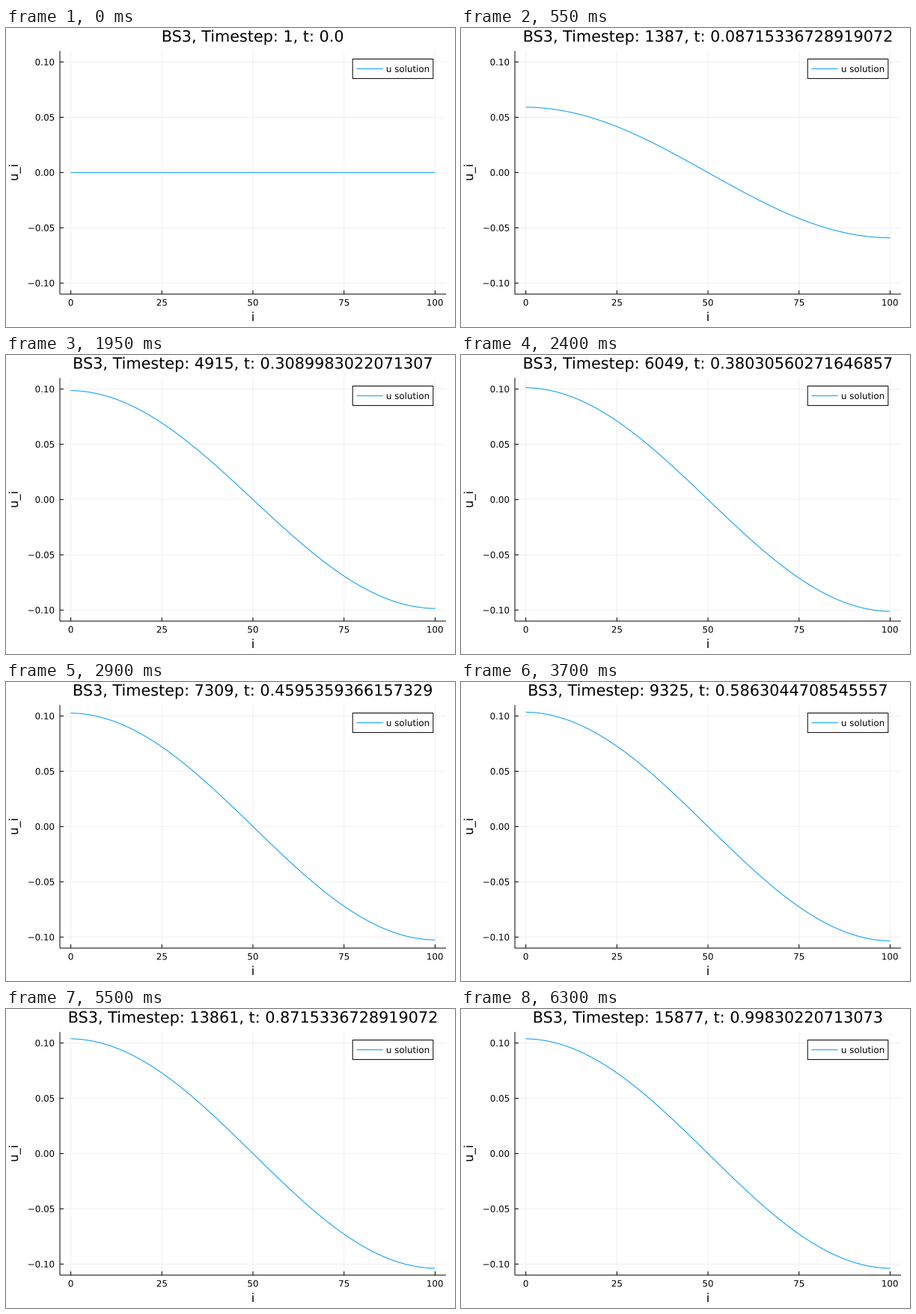
Recreate the animation shown at these times as a matplotlib script. Size 600 by 400 pixels, loop 6350 ms.

```python
import matplotlib.pyplot as plt
import numpy as np
from matplotlib.animation import FuncAnimation
from matplotlib.patches import PathPatch, Rectangle
from matplotlib.textpath import TextPath
from matplotlib.transforms import Affine2D

plt.rcParams["font.family"] = "DejaVu Sans"
plt.rcParams["path.simplify"] = False

W, H, DPI = 600, 400, 100
FRAMES, STRIDE, STEPS = 127, 126, 15903
LEFT, RIGHT, TOP, BOTTOM = 72, 588, 30.7, 356
BLUE = "#009AFA"
PX = 72 / DPI
TITLE, LABEL, TICK = 20.75, 16.3, 11.86  # font sizes in pixels

# Heat equation with insulated ends and a cosine source, solved by modes
N = 101
i = np.arange(N)
k = np.arange(1, N)
rates = 4 * np.sin(np.pi * k / (2 * N)) ** 2 * (N - 1) ** 2
modes = np.cos(np.pi * np.outer(i + 0.5, k) / N) * np.sqrt(2 / N)
source = modes.T @ np.cos(np.pi * i / (N - 1))


def solution(t):
    return modes @ (source * -np.expm1(-rates * t) / rates)


def to_x(v):
    return LEFT + (RIGHT - LEFT) * (v + 3) / 106


def to_y(v):
    return BOTTOM - (BOTTOM - TOP) * (v + 0.11) / 0.22


fig = plt.figure(figsize=(W / DPI, H / DPI), dpi=DPI, facecolor="white")
ax = fig.add_axes([0, 0, 1, 1])
ax.set_xlim(0, W)
ax.set_ylim(H, 0)
ax.axis("off")


def line(xs, ys, color="black", **kw):
    return ax.plot(xs, ys, color=color, lw=PX, snap=False,
                   solid_capstyle="butt", **kw)[0]


def outline(x, y, s, size, align=0.5, angle=0):
    """Text outline with its inked width aligned to x, baseline at y."""
    path = TextPath((0, 0), s, size=size)
    box = path.get_extents()
    shift = -(box.x0 + align * box.width)
    move = Affine2D().translate(shift, 0).scale(1, -1)
    return move.rotate_deg(angle).translate(x, y).transform_path(path)


def text(*args, **kw):
    patch = PathPatch(outline(*args, **kw), fc="black", lw=0, snap=False,
                      zorder=5)
    return ax.add_patch(patch)


for v in (0, 25, 50, 75, 100):
    x = to_x(v)
    line([x, x], [TOP, BOTTOM], alpha=0.06)
    line([x, x], [BOTTOM - 5, BOTTOM])
    text(x, 371.5, str(v), TICK)

for v in (-0.10, -0.05, 0.0, 0.05, 0.10):
    y = to_y(v)
    line([LEFT, RIGHT], [y, y], alpha=0.06)
    line([LEFT, LEFT + 5], [y, y])
    text(64.2, y + 4.4, f"{v:.2f}".replace("-", "\u2212"), TICK, align=1)

line([LEFT, LEFT], [TOP, BOTTOM])
line([LEFT, RIGHT], [BOTTOM, BOTTOM])
text(330, 392, "i", LABEL)
text(16, to_y(0), "u_i", LABEL, angle=-90)

curve = line(to_x(i), to_y(0 * i), BLUE, zorder=3)

ax.add_patch(Rectangle((463.2, 41.5), 107.6, 26.1, fc="white", ec="black",
                       lw=PX, snap=False, zorder=4))
line([468.5, 503.7], [54.6, 54.6], BLUE, zorder=5)
text(508.9, 58.9, "u solution", TICK, align=0)

title = text(330, 18.3, "BS3", TITLE)


def draw(frame):
    step = frame * STRIDE
    t = step / STEPS
    curve.set_ydata(to_y(solution(t)))
    label = f"BS3, Timestep: {step + 1}, t: {t}"
    title.set_path(outline(330, 18.3, label, TITLE))
    return curve, title


anim = FuncAnimation(fig, draw, frames=FRAMES, interval=50,
                     repeat=True, repeat_delay=0)
plt.show()
```
